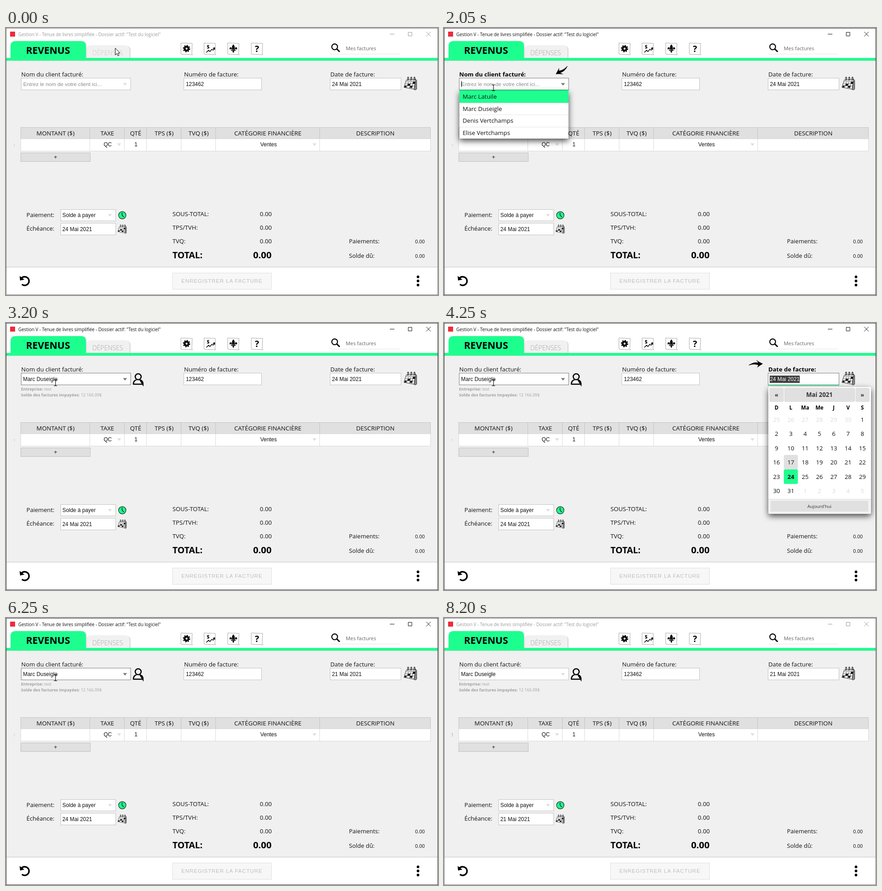
These frames come from a looping animation (951 by 589 pixels, 8250 ms). An HTML page:

```html
<!DOCTYPE html>
<html lang="fr">
<head>
<meta charset="utf-8">
<title>Facturation</title>
<style>
  html, body { margin: 0; width: 100%; height: 100%; overflow: hidden; background: #fff; }
  svg { display: block; width: 951px; height: 589px; }
  text { font-family: "Open Sans", "Noto Sans", sans-serif; fill: #111; }
  .field { font-family: "Liberation Sans", Arial, sans-serif; }
  .b { font-weight: 700; }
  .m { text-anchor: middle; }
  .e { text-anchor: end; }
  .line { fill: none; stroke: #000; }
</style>
</head>
<body>
<svg id="stage" viewBox="0 0 951 589" xmlns="http://www.w3.org/2000/svg"></svg>
<script>
const LOOP = 8250;
const STEP = 50;
const GREEN = '#1fff8f';
const FOCUS_EDGE = '#7d7d7d';
const UI = 13.2;

// Small builders that return SVG markup.
const text = (x, y, s, size = UI, cls = '', fill = '#111', more = '') =>
  `<text x="${x}" y="${y}" font-size="${size}" class="${cls}" style="fill:${fill}" ${more}>${s}</text>`;
const rect = (x, y, w, h, fill, more = '') =>
  `<rect x="${x}" y="${y}" width="${w}" height="${h}" fill="${fill}" ${more}/>`;
const box = (x, y, w, h, fill = '#fff', stroke = '#c2c2c2') =>
  rect(x + .5, y + .5, w, h, fill, `stroke="${stroke}"`);
const path = (d, more = '') => `<path d="${d}" ${more}/>`;
const at = (x, y, s, more = '') => `<g transform="translate(${x} ${y}) ${more}">${s}</g>`;
const on = (spans, s) => `<g data-on="${spans}">${s}</g>`;
const field = (x, y, s, cls = '', fill = '#111') => text(x, y, s, 11.9, 'field ' + cls, fill);
const caretDown = (x, y, fill) => path(`M${x - 4.5} ${y - 2.5}h9l-4.5 5.5z`, `fill="${fill}"`);
const label = (x, y, s, focus, rest) =>
  on(rest, text(x, y, s)) + on(focus, text(x, y, s, 13.1, 'b', '#000'));
const pointer = (x, y, angle) => at(x, y,
  path('M-15 2.5Q-4-5 6-2.5L1-8.5Q9-3 16 0Q9 4 3 8.5L6 3Q-4-.5-15 3.5Z'), `rotate(${angle})`);

function chrome(ink, edge) {
  return text(27, 17.5, 'Gestion V - Tenue de livres simplifiée - Dossier actif: "Test du logiciel"', 9.9, '', ink) +
    path('M845 13.5h10M885.5 9.5h8v8h-8zM925 8.5l10 10M935 8.5l-10 10', `fill="none" stroke="${ink}"`) +
    rect(.5, .5, 950, 588, 'none', `stroke="${edge}"`);
}

function calendarIcon() {
  let s = path('M22 28L24 30L28 28V9L26 6Z', 'fill="#888" stroke="#333"') +
    path('M5 8L26 6L22 28L0 24Z', 'fill="#fff" stroke="#333"') +
    path('M5 8L26 6L25 11L4 12Z', 'fill="#ddd" stroke="#555" stroke-width=".6"') +
    path('M3 16L24.500 16M2 20L23.500 21M10 12L6 25M15.500 12L12 26M20.500 11.500L17.500 27',
      'class="line" stroke-width=".6"') +
    path('M9 16h5l-1.500 4.300h-5zM14 20.500h5l-1 4.500h-5zM2 20h4l-1 4h-4zM20 11.500h5l-1 4.500h-5z', 'fill="#111"');
  for (const x of [8, 15, 22])
    s += path(`M${x} 9V3Q${x + 1} -1 ${x + 2.5} 3V8`, 'class="line" stroke-width="1.1"');
  return s;
}

function header() {
  const card = (x, s) => at(x, 32, path('M1 1L26 2L25 25L27 27L2 26L1 25Z',
    'fill="#fdfdfd" stroke="#aaa"') + s);
  const gear = '<circle cx="13.5" cy="13.5" r="4.2" class="line" stroke-width="4"/>' +
    '<circle cx="13.5" cy="13.5" r="6.8" class="line" stroke-width="2.6" stroke-dasharray="2.67"/>';
  const chart = text(7, 12.5, '$', 10.5, 'b', '#000') +
    path('M6 22L11 17L14 20L18 15L21 17L24 12M20.5 13L24.5 11.5L24.5 16', 'class="line" stroke-width="1.5"');
  const lily = path('M13.5 4Q19 10 14.8 16H12.2Q8 10 13.5 4ZM11.5 17Q10 9 6 11Q4 14 7 16Q7 13 9 14L10 17ZM15.5 17Q17 9 21 11Q23 14 20 16Q20 13 18 14L17 17ZM8.5 16.5h10v1.8h-10zM12.5 18h2l1 2-2 3-2-3z');
  return rect(9, 8, 11, 11, '#ee2b3b') +
    on('0 600,8150 8250', chrome('#9a9a9a', '#777')) +
    on('600 8150', chrome('#111', '#3c3c3c')) +
    path('M178 66V49Q178 39 188 39H264Q274 39 274 49V66Z', 'fill="#d6d6d6"') +
    path('M177 66V48Q177 38 187 38H262Q272 38 272 48V66Z', 'fill="#f1f1f1"') +
    on('0 150', text(190, 60, 'DÉPENSES', 14.2, '', '#cacaca', 'font-weight="300"')) +
    on('150 8250', text(190, 60, 'DÉPENSES', 14.2, '', '#a5a5a5', 'font-weight="300"')) +
    path('M10 67V40Q10 29 21 29H165Q176 29 176 40V67Z', `fill="${GREEN}" filter="url(#soft)"`) +
    text(44, 56.5, 'REVENUS', 21.3, 'b', '#000') +
    rect(1, 72, 949, 1, '#dcdcdc') + rect(1, 66, 949, 6, GREEN) +
    card(384, gear) + card(435, chart) + card(487, lily) +
    card(539, text(13.5, 20.5, '?', 19, 'b m', '#000')) +
    '<circle cx="723.5" cy="41.5" r="6.3" class="line" stroke-width="2.2"/>' +
    path('M728 46L734.5 52.5', 'class="line" stroke-width="3"') +
    text(748, 49, 'Mes factures', 11.2, '', '#666') + rect(714, 57, 154, 1, '#e4e4e4');
}

function table() {
  const cols = [33, 185, 261, 310, 386, 462, 691, 935];
  const names = ['MONTANT ($)', 'TAXE', 'QTÉ', 'TPS ($)', 'TVQ ($)', 'CATÉGORIE FINANCIÈRE', 'DESCRIPTION'];
  let s = '';
  names.forEach((name, i) => {
    const x = cols[i], w = cols[i + 1] - x, mid = x + w / 2;
    s += box(x - 1, 219, w, 25, '#e0e0e0', '#c4c4c4') + box(x - 1, 244, w, 27, '#fff', '#d9d9d9');
    const plain = text(mid, 237, name, 13.35, 'm');
    s += i ? plain : on('0 6300,8150 8250', plain) + on('6300 8150', text(mid, 237, name, 13.2, 'b m', '#000'));
  });
  const focusLine = rect(33, 271, 902, 1, '#35e693') + rect(33, 270, 152, 1, '#35e693');
  return s + field(224, 261, 'QC', 'm') + field(286, 261, '1', 'm') + field(578, 261, 'Ventes', 'm') +
    caretDown(249, 257, '#ddd') + caretDown(679, 257, '#ddd') +
    box(32, 275, 153, 19, '#e0e0e0', '#bfbfbf') + text(109, 289, '+', 13.2, 'm') +
    on('0 6300', text(18.5, 261, '1', 7.5, 'm', '#b5b5b5')) +
    on('8150 8250', text(18.5, 262, '1', 11, 'm', '#aaa')) +
    on('6300 8150', text(18.5, 262, '1', 13, 'b m', '#000') + focusLine + pointer(49, 199, 37)) +
    on('6300 6800,7350 7850', rect(109, 250, 1, 13, '#000'));
}

function fields() {
  const person = '<circle cx="291" cy="118.5" r="6.5" class="line" stroke-width="2.6"/>' +
    path('M280.5 136Q280 127 287 125.5M295 125.5Q302 127 301.5 136ZM280.5 135H301.5', 'class="line" stroke-width="2.6"');
  const note = (y, key, value) => text(33, y, `<tspan class="b">${key}</tspan> ${value}`, 9, '', '#a2a2a2');
  return label(33.5, 106.5, 'Nom du client facturé:', '600 3200', '0 600,3200 8250') +
    box(33, 110, 241, 26) +
    on('600 7250', box(33, 110, 241, 26, '#fff', FOCUS_EDGE) + caretDown(262, 124, '#777')) +
    on('0 600,7250 8250', caretDown(262, 124, '#ddd')) +
    on('0 3200', text(38, 128, 'Entrez le nom de votre client ici...', 11.7, 'field', '#8a8a8a')) +
    on('3200 8250', field(37.5, 128, 'Marc Duseigle') + person +
      note(149, 'Entreprise:', 'test') + note(162, 'Solde des factures impayées:', '12 166.09$')) +
    on('600 3200', rect(33, 136, 242, 2, '#35d58b') + pointer(260, 94, 151)) +
    on('600 1150,1650 2200,2750 3200', rect(38, 117, 1, 13, '#000')) +
    text(392, 106.5, 'Numéro de facture:') + box(391, 110, 171, 26) + field(396, 128, '123462') +
    label(714, 106.5, 'Date de facture:', '3250 6250', '0 3250,6250 8250') + box(713, 110, 156, 26) +
    on('0 3250', field(717.5, 128, '24 Mai 2021')) +
    on('3250 6250', box(713, 110, 156, 26, '#fff', FOCUS_EDGE) + rect(717, 116, 66, 16, '#3a3a3a') +
      field(717.5, 128, '24 Mai 2021', '', '#fff') + rect(713, 136, 157, 2, '#35c583') + pointer(686, 90, 0)) +
    on('6250 8250', field(717.5, 128, '21 Mai 2021')) +
    at(876, 107, calendarIcon());
}

function totals() {
  let s = '';
  ['SOUS-TOTAL:', 'TPS/TVH:', 'TVQ:'].forEach((name, i) => {
    const y = 415 + i * 30;
    s += text(366.5, y, name) + text(585, y, '0.00', UI, 'e');
  });
  return s + text(366.5, 508, 'TOTAL:', 19.6, 'b', '#000') + text(584.5, 508, '0.00', 20.3, 'b e', '#000') +
    text(755, 475, 'Paiements:', 13) + text(922, 475, '0.00', 10.8, 'e') +
    text(755, 507, 'Solde dû:', 13) + text(922, 507, '0.00', 10.8, 'e') +
    text(45, 417, 'Paiement:', 13.1) + box(120, 400, 121, 25) + field(124, 417, 'Solde à payer') +
    caretDown(229, 413, '#ddd') +
    `<circle cx="256" cy="413" r="8.2" fill="${GREEN}" stroke="#222" stroke-width="1.2"/>` +
    path('M255.5 407V413L259.5 417', 'class="line" stroke-width="1.2"') +
    text(45, 447, 'Échéance:', 13.1) + box(120, 430, 121, 26) +
    on('6350 6500', rect(121, 431, 120, 25, '#efefef')) +
    on('0 6350', field(124, 448, '24 Mai 2021')) + on('6350 8250', field(124, 448, '21 Mai 2021')) +
    at(246, 433, calendarIcon(), 'scale(.68)');
}

function footer() {
  return rect(1, 527, 949, 61, '#fff') + rect(1, 527, 949, 1, '#c4c4c4') +
    box(366, 540, 218, 36, '#f7f7f7', '#dedede') +
    text(386, 562, 'ENREGISTRER LA FACTURE', 11.5, 'field', '#bdbdbd', 'letter-spacing="1"') +
    path('M34 552A9.5 9.5 0 1 1 35 565.5', 'class="line" stroke-width="3.4"') +
    path('M30 547L31 557L40.5 555Z') +
    [549, 558, 567].map(y => `<circle cx="907" cy="${y}" r="2.9"/>`).join('');
}

function clientList() {
  const names = ['Marc Latuile', 'Marc Duseigle', 'Denis Vertchamps', 'Elise Vertchamps'];
  const lit = ['600 1200,2050 2300', '1200 2050,2300 3200'];
  let s = rect(34, 138, 240, 106, '#fff', 'filter="url(#shade)"');
  names.forEach((name, i) => {
    const y = 138 + i * 26.5;
    if (i) s += rect(34, Math.round(y), 240, 1, '#e6e6e6');
    if (lit[i]) s += on(lit[i], rect(34, Math.round(y), 240, 27 - i, GREEN));
    s += text(41, y + 18, name);
  });
  return on('600 3200', s);
}

function calendar() {
  const pitch = 31.5;
  const colX = i => 732 + i * pitch;
  const hover = { 17: '4250 4650', 18: '4650 4850', 19: '4850 5050', 20: '5050 5200', 21: '5200 6250' };
  let s = rect(714, 141, 226, 280, '#fff', 'rx="4" filter="url(#shade)"') +
    path('M714 388.5H940V417Q940 421 936 421H718Q714 421 714 417Z', 'fill="#f2f2f2"') + rect(714, 388, 226, 1, '#ddd') +
    rect(716, 143, 32, 31, '#e0e0e0', 'rx="3"') + rect(749, 143, 156, 31, '#e0e0e0', 'rx="3"') +
    rect(906, 143, 31, 31, '#e0e0e0', 'rx="3"') +
    text(732, 163, '«', 13, 'b m', '#333') + text(921, 163, '»', 13, 'b m', '#333') +
    text(826.5, 162.5, 'Mai 2021', 13.3, 'b m', '#333') +
    rect(719, 392, 215, 24, '#e0e0e0') + text(826.5, 407.5, "Aujourd'hui", 9.8, 'm', '#333');
  ['D', 'L', 'Ma', 'Me', 'J', 'V', 'S'].forEach((d, i) => s += text(colX(i), 191, d, 11.5, 'b m', '#000'));
  for (let i = 0; i < 42; i++) {
    const n = i - 5, inside = n > 0 && n < 32, day = inside ? n : n < 1 ? n + 30 : n - 31;
    const c = i % 7, y = 197 + Math.floor(i / 7) * pitch;
    const cell = fill => rect(Math.floor(716.5 + c * pitch), Math.floor(y), 31, 32, fill, 'rx="3"');
    if (inside && hover[n]) s += on(hover[n], cell('#e0e0e0'));
    if (n === 24) s += cell(GREEN);
    s += text(colX(c), Math.round(y + 20.5), day, UI, n === 24 ? 'b m' : 'm', inside ? '#111' : '#dadada');
  }
  return on('3250 6250', s);
}

const defs = `<defs><filter id="shade" x="-20%" y="-20%" width="140%" height="150%">
  <feDropShadow dx="0" dy="5" stdDeviation="7" flood-opacity=".7"/></filter>
  <filter id="soft"><feDropShadow dx="1" dy="0" stdDeviation="1" flood-opacity=".2"/></filter></defs>`;
const cursors = '<g id="arrow">' +
  path('M.5.5V15.5L4 12.2L6.4 17.5L8.8 16.4L6.5 11.3H11Z', 'fill="#fff" stroke="#000"') + '</g>' +
  '<g id="beam">' + path('M-3.5-6.5H-1Q0-6.5 0-5.5V5.5Q0 6.5-1 6.5H-3.5M3.5-6.5H1Q0-6.5 0-5.5M3.5 6.5H1Q0 6.5 0 5.5',
    'class="line" stroke-width="1.1"') + '</g>';

const stage = document.getElementById('stage');
stage.innerHTML = defs + rect(0, 0, 951, 589, '#fff') + rect(1, 72, 949, 455, '#f0f0f0') +
  header() + fields() + table() + totals() + footer() + clientList() + calendar() + cursors;

const timed = [...stage.querySelectorAll('[data-on]')].map(el => ({
  el, spans: el.dataset.on.split(',').map(s => s.split(' ').map(Number))
}));
const arrow = document.getElementById('arrow');
const beam = document.getElementById('beam');

// Mouse path: time, x, y.
const route = [
  [0, 240, 44], [50, 236, 48], [300, 150, 104], [550, 92, 132], [750, 92, 132], [950, 102, 127],
  [1450, 102, 127], [1650, 109, 132], [7150, 109, 132], [7200, 108, 141], [7350, 215, 40],
  [7500, 400, 70], [7650, 540, 220], [7900, 530, 592], [LOOP, 530, 592]
];

function mouse(t) {
  const i = route.findIndex(p => p[0] > t);
  const [t0, x0, y0] = route[i - 1], [t1, x1, y1] = route[i];
  const k = (t - t0) / (t1 - t0);
  return [Math.round(x0 + (x1 - x0) * k), Math.round(y0 + (y1 - y0) * k)];
}

const show = (el, yes) => { el.style.display = yes ? '' : 'none'; };

function draw(time) {
  const t = Math.floor((time % LOOP) / STEP) * STEP;
  for (const { el, spans } of timed) show(el, spans.some(([a, b]) => t >= a && t < b));
  const [x, y] = mouse(t);
  const typing = t >= 3250 && t < 4250;
  const overField = t < 7200 && y >= 111 && y < 137;
  show(arrow, !overField && t < 7900);
  show(beam, overField && !typing);
  arrow.setAttribute('transform', `translate(${x} ${y})`);
  beam.setAttribute('transform', `translate(${x} ${y})`);
}

const start = performance.now();
function tick() {
  draw(performance.now() - start);
  requestAnimationFrame(tick);
}
tick();
</script>
</body>
</html>
```
